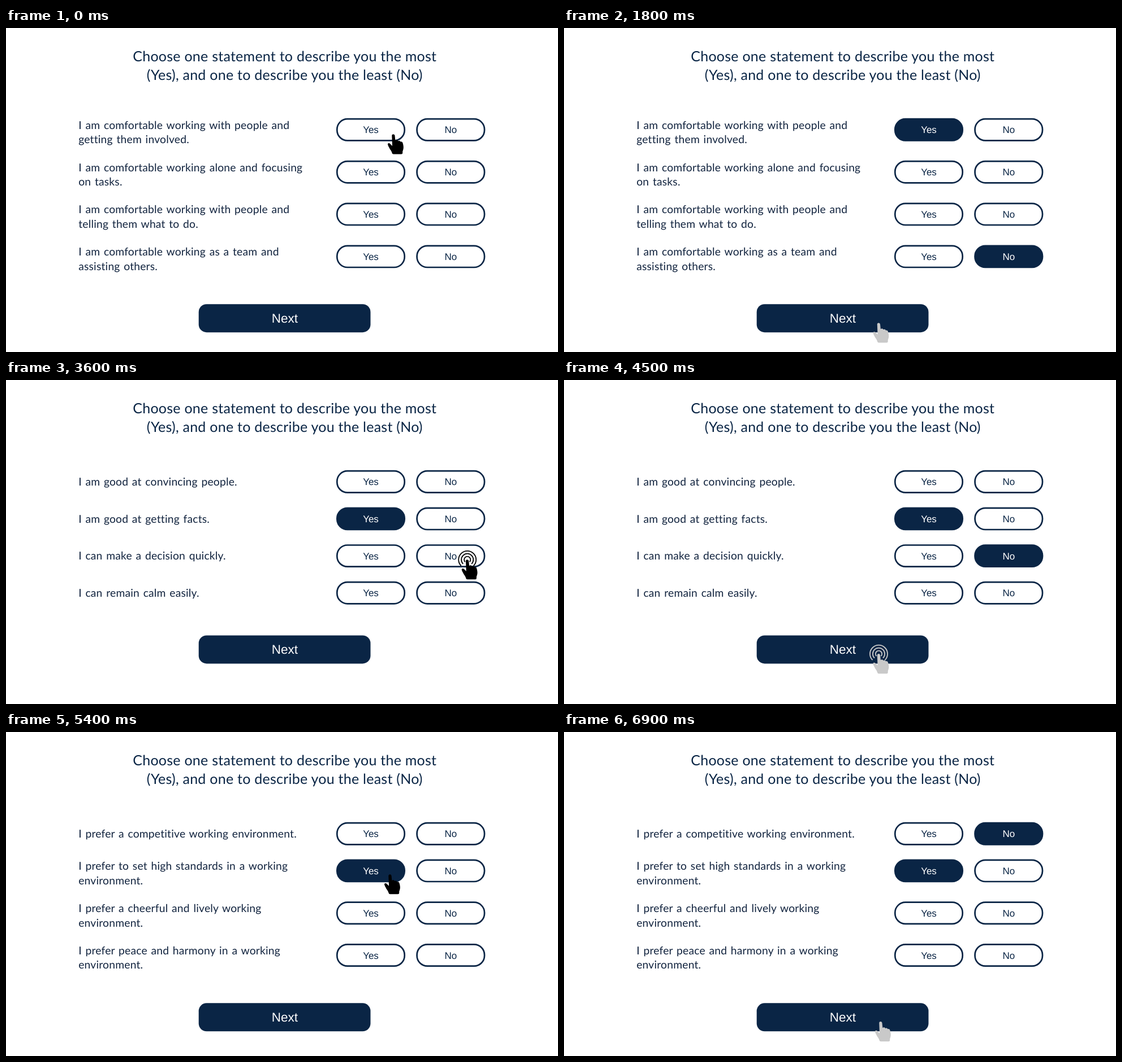
Write an HTML page that moves like this. It is 976x574 px and loops after 7200 ms.

```html
<!DOCTYPE html>
<html lang="en">
<head>
<meta charset="utf-8">
<title>Statement quiz</title>
<style>
  html, body { margin: 0; width: 100%; height: 100%; overflow: hidden; background: #fff; }
  svg { display: block; width: 976px; height: 574px; }
  text { fill: #0a2545; text-rendering: geometricPrecision; }
  .title { font: 25px Lato, sans-serif; letter-spacing: .25px; text-anchor: middle; }
  .line { font: 19.3px Lato, sans-serif; letter-spacing: .2px; word-spacing: 1.5px; fill: #12243f; }
  .label { font: 17px "Liberation Sans", Arial, sans-serif; text-anchor: middle; }
  .next { font: 22.5px "Liberation Sans", Arial, sans-serif; text-anchor: middle; }
  .pill { fill: #fff; stroke: #0a2545; stroke-width: 2.7; }
  .on .pill, .bar { fill: #0a2545; }
  .on text, text.next { fill: #fff; }
  .rings { fill: none; stroke-width: 1.8; }
</style>
</head>
<body>
<svg id="stage" viewBox="0 0 976 574" xmlns="http://www.w3.org/2000/svg"></svg>
<script>
const STEP = 300, STEPS = 8;
const GREY = '#c9c9c9', BLACK = '#000';

// Each page: row centres, statements, chosen rows and cursor stops [x, y]
const pages = [
  {
    rows: [180.3, 255.2, 329.9, 404.9],
    lines: [
      ['I am comfortable working with people and', 'getting them involved.'],
      ['I am comfortable working alone and focusing', 'on tasks.'],
      ['I am comfortable working with people and', 'telling them what to do.'],
      ['I am comfortable working as a team and', 'assisting others.']
    ],
    next: 489.2, yes: 0, no: 3,
    stops: [[685, 188.4], [816.3, 411.4], [556.5, 522.5]]
  },
  {
    rows: [180.3, 245.9, 311.6, 377.2],
    lines: [
      ['I am good at convincing people.'],
      ['I am good at getting facts.'],
      ['I can make a decision quickly.'],
      ['I can remain calm easily.']
    ],
    next: 452.4, yes: 1, no: 2,
    stops: [[675, 252.3], [815.7, 318.3], [556.5, 485.2]]
  },
  {
    rows: [180.3, 245.9, 320.8, 395.5],
    lines: [
      ['I prefer a competitive working environment.'],
      ['I prefer to set high standards in a working', 'environment.'],
      ['I prefer a cheerful and lively working', 'environment.'],
      ['I prefer peace and harmony in a working', 'environment.']
    ],
    next: 480.3, yes: 1, no: 0, lastClick: false,
    stops: [[679, 252.3], [819, 187.3], [560, 513.2]]
  }
];

const HAND = 'M-2.7 2.6A2.6 2.6 0 0 1 2.5 2.4L3.4 11c1-1.6 4-1.4 4.8.8c1.2-1 3.6-.7 4.2 1.4' +
  'c1.2-.8 3.5 0 4 2C17.6 19 18.3 23 17.5 26C16.9 28.5 16.2 29.5 16.2 31V33Q16.2 35 14 35' +
  'H0Q-2 35-2.4 33C-3 30-5 28-6.5 25.5C-8 22.5-9.5 20-10 18C-10.3 15.5-7.5 15-6 16.5L-2 20.5Z';

const text = (cls, x, y, s) => `<text class="${cls}" x="${x}" y="${y}">${s}</text>`;

const button = (x, cy, s, on) => `<g class="${on ? 'on' : ''}">
  <rect class="pill" x="${x + 1.3}" y="${cy - 19.1}" width="119.4" height="38.2" rx="18.4"/>
  ${text('label', x + 61, cy + 6, s)}</g>`;

function ring(r) {
  const d = r * Math.SQRT1_2;
  return `M${-d} ${d}A${r} ${r} 0 1 1 ${d} ${d}`;
}
const RINGS = [5.6, 10.6, 15.5].map(ring).join('');

function cursor([x, y], color, click) {
  const rings = click ? `<path class="rings" stroke="${color}" d="${RINGS}"/>` : '';
  return `<g transform="translate(${x} ${y})">${rings}<path fill="${color}" d="${HAND}"/></g>`;
}

function row(page, i, step) {
  const cy = page.rows[i], lines = page.lines[i];
  const base = cy + (lines.length > 1 ? -1.6 : 6.7);
  return lines.map((s, n) => text('line', 128.2, base + n * 25.3, s)).join('') +
    button(584, cy, 'Yes', page.yes === i && step >= 2) +
    button(725.3, cy, 'No', page.no === i && step >= 5);
}

// Steps per page: arrive, click, chosen for Yes and for No, then arrive and click on Next
function draw(page, step) {
  const stop = Math.floor(step / 3);
  const click = step % 3 === 1 && !(stop === 2 && page.lastClick === false);
  return text('title', 492.8, 59.4, 'Choose one statement to describe you the most') +
    text('title', 492.8, 92.4, '(Yes), and one to describe you the least (No)') +
    page.rows.map((_, i) => row(page, i, step)).join('') +
    `<rect class="bar" x="340.7" y="${page.next}" width="303.8" height="50" rx="14"/>` +
    text('next', 492.8, page.next + 32.6, 'Next') +
    cursor(page.stops[stop], stop === 2 ? GREY : BLACK, click);
}

const stage = document.getElementById('stage');
const start = performance.now();
let shown = -1;

function update(now) {
  const tick = Math.floor(Math.max(0, now - start) / STEP) % (STEPS * pages.length);
  if (tick !== shown) {
    shown = tick;
    stage.innerHTML = draw(pages[Math.floor(tick / STEPS)], tick % STEPS);
  }
  requestAnimationFrame(update);
}
update(start);
</script>
</body>
</html>
```
